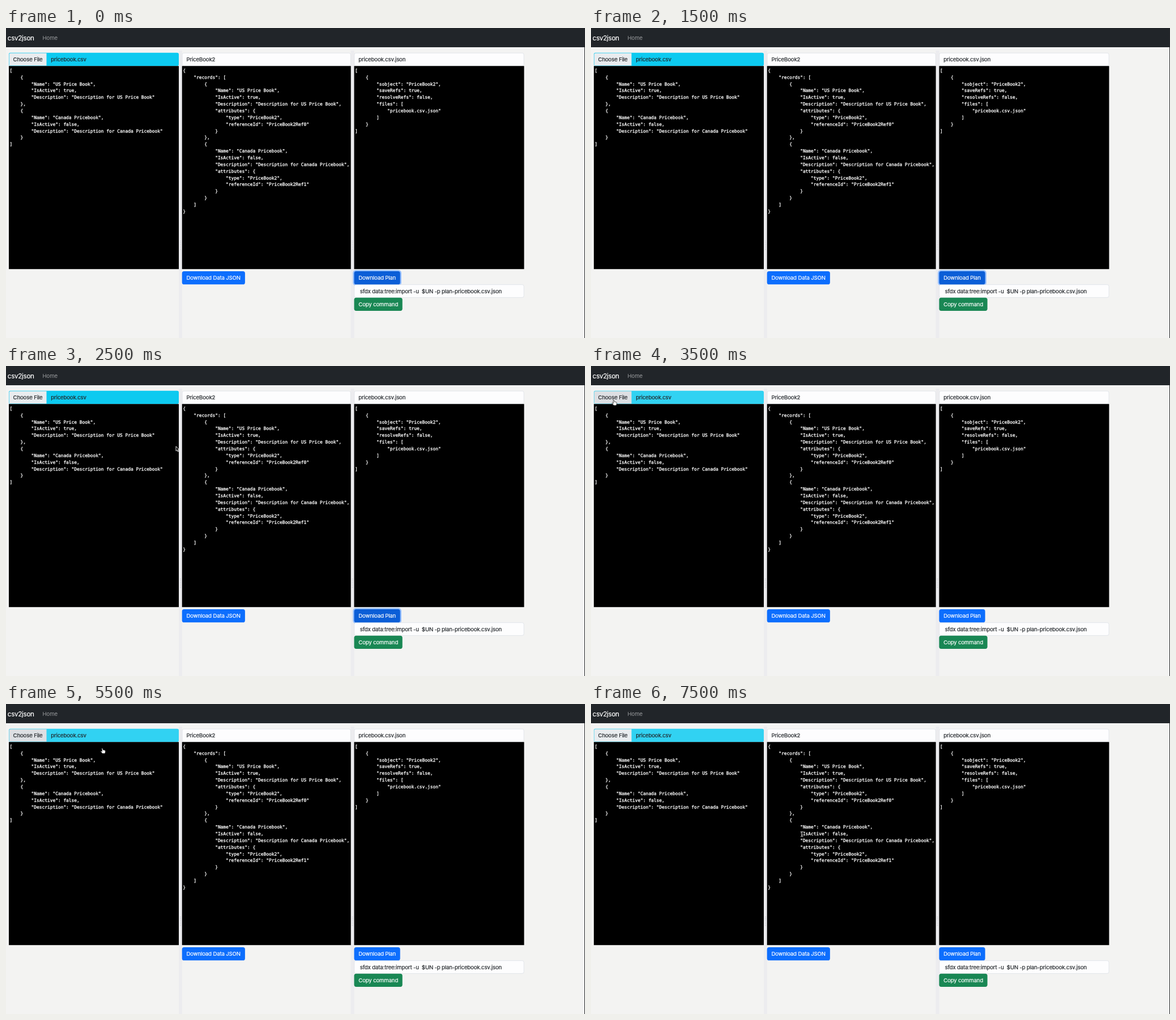
These frames come from a looping animation (1022x548 px, 8000 ms). An HTML page:

```html
<!DOCTYPE html>
<html lang="en">
<head>
<meta charset="utf-8">
<title>csv2json</title>
<style>
  html, body { margin: 0; width: 100%; height: 100%; overflow: hidden; background: #f3f3f2; }
  svg { display: block; width: 1022px; height: 548px; }
  text { white-space: pre; stroke-width: .2; }
  .ui { font: 9.6px Inter, "Open Sans", sans-serif; letter-spacing: -.14px; fill: #212529; stroke: #212529; }
  .brand { font-size: 11.7px; letter-spacing: -.32px; fill: #fff; stroke: #fff; }
  .nav { fill: #9b9d9f; stroke: none; }
  .light { fill: #fff; stroke: #fff; }
  .code { font: 7.89px "DejaVu Sans Mono", monospace; fill: #fff; stroke: #fff; stroke-width: .3; }
  .field { fill: #fdfdfe; stroke: #d9dde4; stroke-width: .7; }
</style>
</head>
<body>
<svg id="stage" viewBox="0 0 1022 548">
  <defs>
    <path id="arrow" d="M0 0V8.2L1.9 6.5L3.2 9.5L4.6 8.9L3.3 6H5.8Z" fill="#000" stroke="#fff" stroke-width=".9"/>
    <path id="hand" d="M-2-4.6Q-1.2-5.4-.5-4.6L.4-1.7Q1.2-2.4 1.9-1.5Q2.8-1.9 3.3-1Q4.3-1.2 4.5 0L4.3 2.4L3.5 4.6H-.8L-3.9.8Q-4-.3-2.9 0L-1.4 1Z" fill="#fff" stroke="#111" stroke-width=".7"/>
    <path id="beamLine" d="M-2.2-4.5Q0-4.5 0-3.3Q0-4.5 2.2-4.5M0-3.3V3.3M-2.2 4.5Q0 4.5 0 3.3Q0 4.5 2.2 4.5M-1.1 1.6H1.1"/>
    <g id="beam" fill="none">
      <use href="#beamLine" stroke="#000" stroke-width="2"/>
      <use href="#beamLine" stroke="#fff" stroke-width=".9"/>
    </g>
  </defs>
</svg>
<script>
const stage = document.getElementById('stage');
const ROW = 23.35;             // height of every input and button
const COLUMNS = [5, 310.7, 614.5];
const WIDTHS = [300, 298, 300];
const TOP = 43.85, PANEL = TOP + ROW, BOTTOM = 430;

function add(tag, attrs, content) {
  const el = document.createElementNS('http://www.w3.org/2000/svg', tag);
  for (const key in attrs) el.setAttribute(key, attrs[key]);
  if (content !== undefined) el.textContent = content;
  stage.append(el);
  return el;
}
const rect = (x, y, width, height, fill, rx = 0) => add('rect', { x, y, width, height, fill, rx });
const label = (x, y, content, cls = '') => add('text', { x, y, class: 'ui ' + cls }, content);

function field(x, y, width, content, pad = 7.8) {
  add('rect', { x: x + .35, y: y + .35, width: width - .7, height: ROW - .7, rx: 3, class: 'field' });
  label(x + pad, y + 15.2, content);
}

function button(x, y, width, fill, content) {
  const box = rect(x, y, width, ROW, fill, 3.7);
  label(x + 7.8, y + 15.2, content, 'light');
  return box;
}

function codePanel(column, data) {
  const x = COLUMNS[column];
  rect(x, PANEL, WIDTHS[column], 426.2 - PANEL, '#000');
  JSON.stringify(data, null, 4).split('\n').forEach((line, i) => {
    const indent = line.search(/\S/);
    add('text', { x: x + 1.6 + indent * 4.737, y: 77.8 + i * 11.857, class: 'code' }, line.trim());
  });
}

const books = [['US Price Book', true], ['Canada Pricebook', false]].map(([Name, IsActive]) =>
  ({ Name, IsActive, Description: 'Description for ' + Name }));
const records = books.map((book, i) =>
  ({ ...book, attributes: { type: 'PriceBook2', referenceId: 'PriceBook2Ref' + i } }));
const plan = [{ sobject: 'PriceBook2', saveRefs: true, resolveRefs: false, files: ['pricebook.csv.json'] }];

// Page background, split gutters and navigation bar
rect(0, 0, 1022, 548, '#f3f3f2');
for (const x of [305, 608.6]) {
  rect(x, 40, 6, 508, '#ececef');
  for (let y = 376; y < 394; y += 3) rect(x + 2, y, 2, 1.2, '#d0d0d8');
}
rect(0, 0, 1022, 34, '#212529');
rect(1021, 0, 1, 548, '#25272a');
label(2.8, 21.6, 'csv2json', 'brand');
label(64.6, 20.6, 'Home', 'nav');

// File picker
const fileBar = rect(5, TOP, 300, ROW, '#0dcaf0', 3);
const chooser = add('path', { d: `M71.5 ${TOP + .6}H8.2Q5.6 ${TOP + .6} 5.6 ${TOP + 3.2}V${PANEL - .6}H71.5Z` });
label(12.6, TOP + 15.2, 'Choose File');
label(79.2, TOP + 15.2, 'pricebook.csv');

field(COLUMNS[1], TOP, WIDTHS[1], 'PriceBook2');
field(COLUMNS[2], TOP, WIDTHS[2], 'pricebook.csv.json');

codePanel(0, books);
codePanel(1, { records });
codePanel(2, plan);

button(COLUMNS[1], BOTTOM, 111.2, '#0d6efd', 'Download Data JSON');
const focusRing = rect(COLUMNS[2] - 2.3, BOTTOM - 2.3, 85.8, ROW + 4.6, '#98c1fe', 5.5);
field(COLUMNS[2], BOTTOM + ROW, WIDTHS[2], 'sfdx data:tree:import -u  $UN -p plan-pricebook.csv.json', 10.3);
const planButton = button(COLUMNS[2], BOTTOM, 81.2, '#0b5ed7', 'Download Plan');
button(COLUMNS[2], BOTTOM + 2 * ROW, 85.2, '#198754', 'Copy command');
const cursor = add('use', {});

// time, pointer shape, x, y
const steps = [
  [0, '', 0, 0],
  [2000, 'arrow', 581.5, 226.8],
  [2500, 'arrow', 300, 142],
  [3000, 'hand', 41, 65.2],
  [5500, 'hand', 171, 83],
  [6000, 'beam', 270, 150],
  [6500, 'beam', 345, 210],
  [7000, 'beam', 372.3, 230]
];

function draw(now) {
  const t = now % 8000;
  const [, shape, x, y] = steps.findLast(step => step[0] <= t);
  const blurred = t >= 3500;
  cursor.setAttribute('href', '#' + shape);
  cursor.setAttribute('transform', `translate(${x} ${y})`);
  cursor.setAttribute('visibility', shape ? 'visible' : 'hidden');
  fileBar.setAttribute('fill', t >= 3000 ? '#31d2f2' : '#0dcaf0');
  chooser.setAttribute('fill', t >= 3000 && t < 6000 ? '#dddfe3' : '#e9ecef');
  focusRing.setAttribute('visibility', blurred ? 'hidden' : 'visible');
  planButton.setAttribute('fill', blurred ? '#0d6efd' : '#0b5ed7');
}

const start = performance.now();
function tick() {
  draw(performance.now() - start);
  requestAnimationFrame(tick);
}
tick();
</script>
</body>
</html>
```
